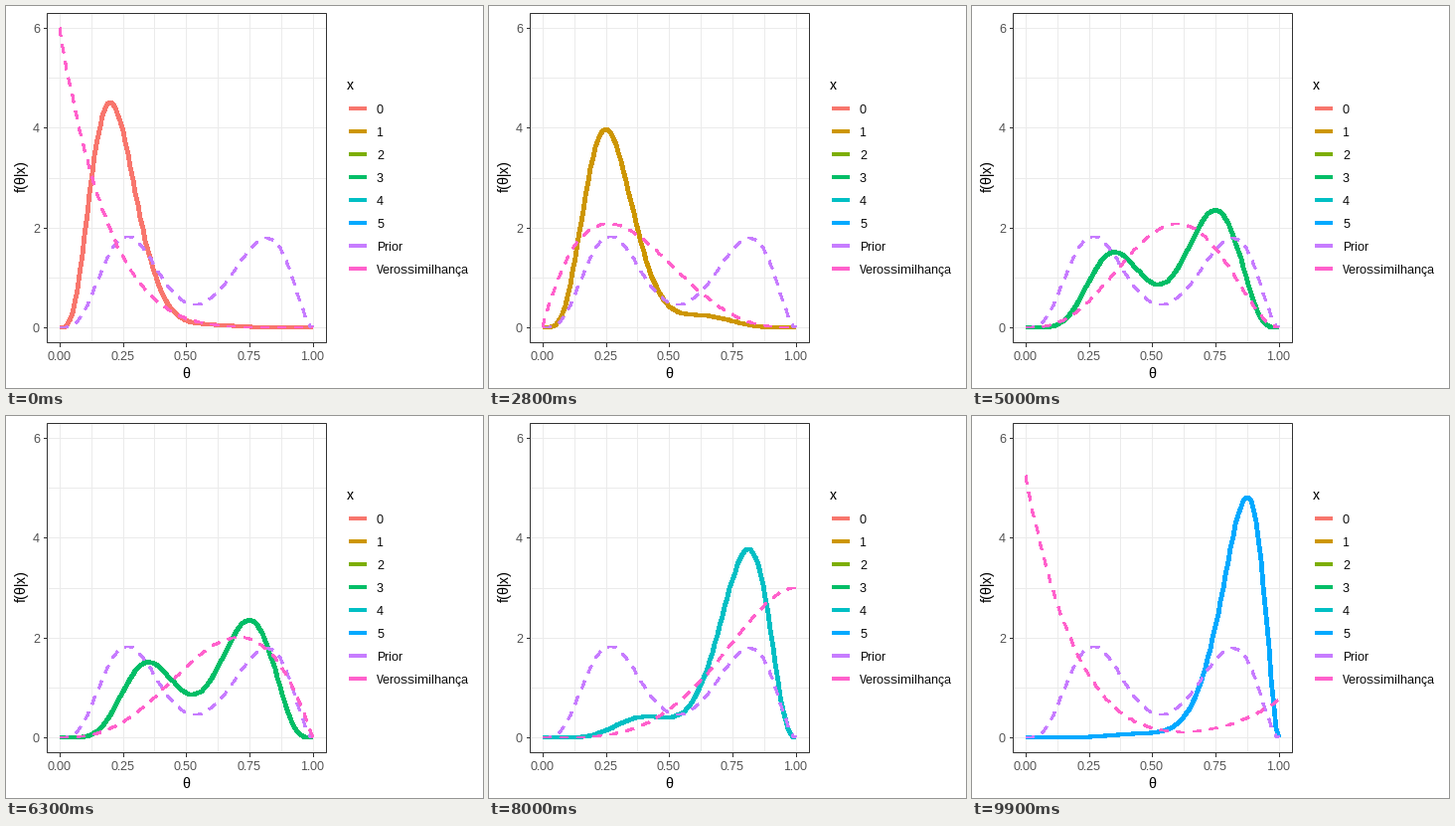
A matplotlib script that plays this animation: 480x384 px, repeating every 10 s.

```python
from math import comb

import matplotlib as mpl
import matplotlib.pyplot as plt
import numpy as np
from matplotlib.animation import FuncAnimation
from matplotlib.patches import Rectangle

mpl.rcParams["font.family"] = "Liberation Sans"
mpl.rcParams["text.hinting"] = "default"
mpl.rcParams["text.hinting_factor"] = 1
mpl.rcParams["text.kerning_factor"] = 6  # no kerning

W, H, DPI = 480, 384, 96
PX = 72 / DPI  # points per pixel
N = 5  # trials
STARTS = [9, 26, 43, 60, 77, 93]  # first frame of each change
STEPS = 8

STATE_COLORS = ["#F8766D", "#CD9600", "#7CAE00", "#00BE67", "#00BFC4", "#00A9FF"]
PRIOR_COLOR, LIK_COLOR = "#C77CFF", "#FF61CC"
PRIOR_PARTS = [(5, 12), (10, 3)]

theta = np.linspace(0, 1, 101)


# Data to whole pixels
def to_x(v):
    return np.floor(54.25 + 255 * np.asarray(v))


def to_y(v):
    return np.floor(323.6 - 50.18 * np.asarray(v))


def beta_norm(a, b):
    return (a + b - 1) * comb(a + b - 2, a - 1)


def beta_pdf(a, b):
    return beta_norm(a, b) * theta ** (a - 1) * (1 - theta) ** (b - 1)


def likelihood(x):
    return beta_pdf(x + 1, N - x + 1)


def posterior(x):
    parts = [(a + x, b + N - x) for a, b in PRIOR_PARTS]
    weights = [beta_norm(*p) / beta_norm(*q) for p, q in zip(PRIOR_PARTS, parts)]
    total = sum(w * beta_pdf(*q) for w, q in zip(weights, parts))
    return total / sum(weights)


prior = sum(beta_pdf(a, b) for a, b in PRIOR_PARTS) / 2
likelihoods = [likelihood(x) for x in range(N + 1)]
posteriors = [posterior(x) for x in range(N + 1)]

fig = plt.figure(figsize=(W / DPI, H / DPI), dpi=DPI, facecolor="white")
ax = fig.add_axes([0, 0, 1, 1])
ax.set_xlim(0, W)
ax.set_ylim(H, 0)
ax.axis("off")


def line(xs, ys, color, width, z, **kw):
    return ax.plot(xs, ys, color=color, lw=width * PX, zorder=z, antialiased=False,
                   solid_capstyle="butt", solid_joinstyle="round",
                   dash_joinstyle="round", **kw)[0]


def text(x, y, s, px=12, color="black", **kw):
    ax.text(x, y, s, fontsize=px * PX, color=color, va="baseline", **kw)


LEFT, RIGHT, TOP, BOTTOM = 41, 322, 7, 338

# Grid, ticks and tick labels
for i in range(9):
    x = to_x(i / 8)
    line([x, x], [TOP, BOTTOM], "#EBEBEB", 1, 1)
    if i % 2 == 0:
        line([x, x], [BOTTOM, BOTTOM + 4], "#333333", 1, 6)
        text(x, 356, f"{i / 8:.2f}", color="#4D4D4D", ha="center")
for i in range(7):
    y = to_y(i)
    line([LEFT, RIGHT], [y, y], "#EBEBEB", 1, 1)
    if i % 2 == 0:
        line([LEFT - 3, LEFT], [y, y], "#333333", 1, 6)
        text(34, y + 5, str(i), color="#4D4D4D", ha="right")
ax.add_patch(Rectangle((LEFT, TOP), RIGHT - LEFT, BOTTOM - TOP, fill=False,
                       ec="#333333", lw=PX, zorder=6))

# Titles
text(181.5, 374, "θ", 14.67, ha="center")
text(20, 171, "f(θ|x)", 14.67, ha="center", rotation=90, rotation_mode="anchor")
text(343, 84, "x", 14.67)

# Legend
names = [str(x) for x in range(N + 1)] + ["Prior", "Verossimilhança"]
for i, (name, color) in enumerate(zip(names, STATE_COLORS + [PRIOR_COLOR, LIK_COLOR])):
    y = round(103 + 23.04 * i)
    line([345, 363], [y, y], color, 4, 3)
    text(373, y + 5, name)

# Curves
THICK, THIN, DASH = 3.7, 1.6, 8
dashed = dict(ls=(0, (DASH / THIN, DASH / THIN)))
post_line = line(to_x(theta), to_y(posteriors[0]), STATE_COLORS[0], THICK, 3)
line(to_x(theta), to_y(prior), PRIOR_COLOR, THIN, 4, **dashed)
lik_line = line(to_x(theta), to_y(likelihoods[0]), LIK_COLOR, THIN, 5, **dashed)


def update(frame):
    state = sum(frame >= s + STEPS - 1 for s in STARTS)
    t = max(0, frame - STARTS[state] + 1) / STEPS
    following = (state + 1) % (N + 1)
    lik_line.set_ydata(to_y((1 - t) * likelihoods[state] + t * likelihoods[following]))
    post_line.set_ydata(to_y(posteriors[state]))
    post_line.set_color(STATE_COLORS[state])
    return post_line, lik_line


anim = FuncAnimation(fig, update, frames=100, interval=100, repeat=True, repeat_delay=0)
plt.show()
```
